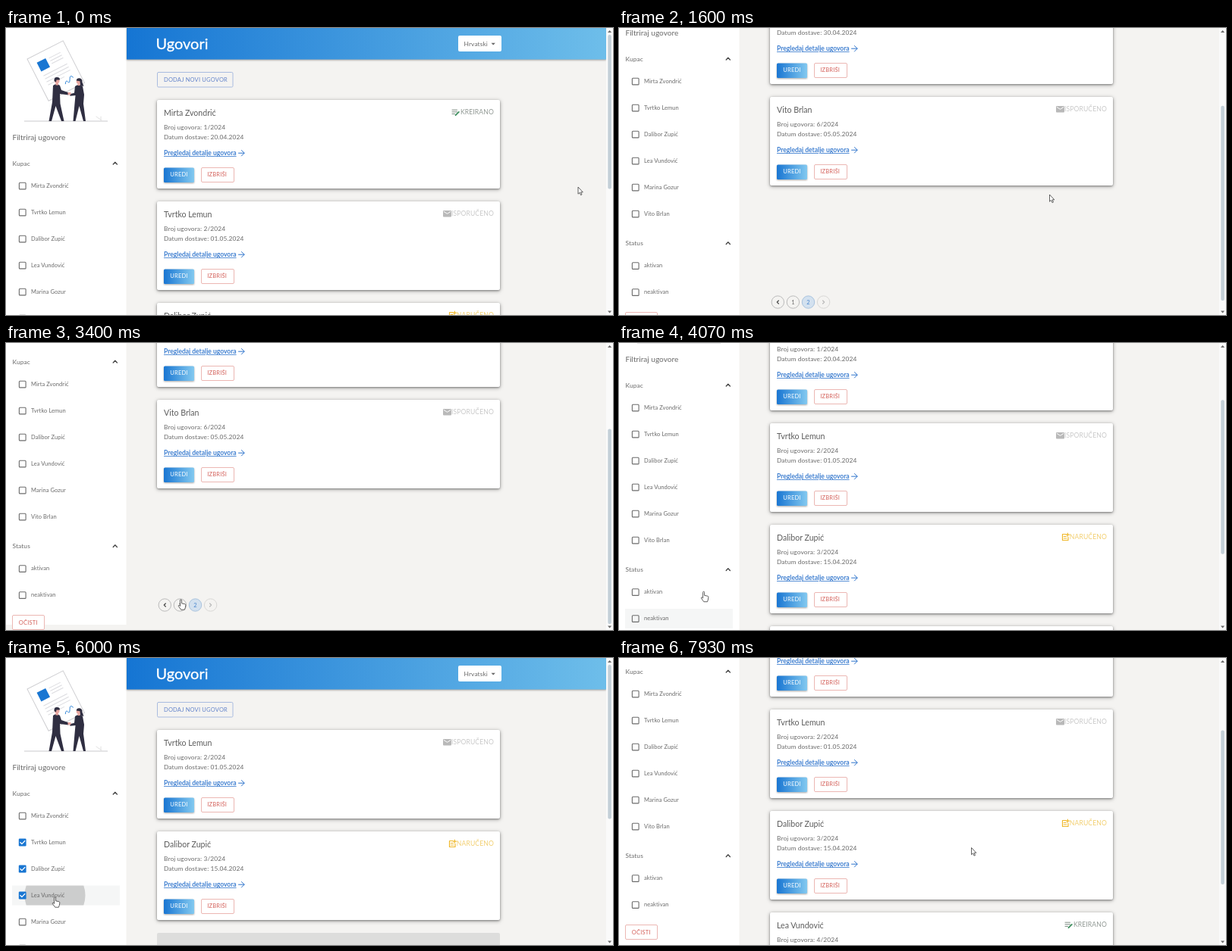
These frames come from a looping animation (800 by 379 pixels, 8000 ms). An HTML page:

```html
<!DOCTYPE html>
<html lang="hr">
<head>
<meta charset="utf-8">
<title>Ugovori</title>
<style>
  html, body { margin: 0; width: 100%; height: 100%; overflow: hidden; background: #f4f3f1; }
  svg { display: block; width: 800px; height: 379px; font-family: Lato, sans-serif; }
  text { fill: #6a6a6a; }
  .title { font-size: 20px; fill: #fff; stroke: #fff; stroke-width: .3px; }
  .heading { font-size: 10.1px; }
  .name { font-size: 10.6px; fill: #5c5c5c; }
  .body { font-size: 8.4px; letter-spacing: .1px; }
  .status { font-size: 8.6px; letter-spacing: .12px; text-anchor: end; }
  .item { font-size: 7.5px; letter-spacing: .08px; }
  .btn { font-size: 7.5px; letter-spacing: .2px; }
  .red { fill: #d4605a; }
  .link { font-size: 8.5px; font-weight: 700; fill: #3f7fd0; text-decoration: underline; }
  .line { fill: none; stroke-linecap: round; stroke-linejoin: round; }
  .card { fill: #fff; filter: drop-shadow(0 1px 1px rgba(0,0,0,.3)) drop-shadow(0 1.5px 2.5px rgba(0,0,0,.35)); }
  .lift { filter: drop-shadow(0 1px 1px rgba(0,0,0,.35)); }
</style>
</head>
<body>
<svg viewBox="0 0 800 379">
  <defs>
    <linearGradient id="bar"><stop stop-color="#1575d3"/><stop offset="1" stop-color="#6ebeea"/></linearGradient>
    <linearGradient id="edit"><stop stop-color="#1976d2"/><stop offset="1" stop-color="#83c9f0"/></linearGradient>
    <clipPath id="rowClip"><rect id="rowBox" x="8" width="142" height="26"/></clipPath>
  </defs>
  <rect width="800" height="379" fill="#f4f3f1"/>
  <g id="page">
    <rect id="side" width="158.5" fill="#fff"/>
    <g id="art"></g>
    <g id="filters"></g>
    <rect class="lift" x="159" width="632" height="41.5" fill="url(#bar)"/>
    <text class="title" x="197.5" y="28">Ugovori</text>
    <rect x="596" y="10" width="57" height="21" rx="2" fill="#fff"/>
    <text class="body" x="603.5" y="23.6">Hrvatski</text>
    <path d="M639.5 19.8h5.4l-2.7 2.8z" fill="#666"/>
    <rect x="199.5" y="58.5" width="99.5" height="19.5" rx="1.5" fill="none" stroke="#a9bbe0"/>
    <text class="btn" x="208" y="70.7" style="fill:#6484cb">DODAJ NOVI UGOVOR</text>
    <g id="list"></g>
  </g>
  <rect x="791" width="9" height="379" fill="#fafafa"/>
  <path d="M793 6l2.6-3 2.6 3zM793 373.5l2.6 3 2.6-3z" fill="#6b6b6b"/>
  <rect id="thumb" x="793.3" width="4.6" rx="2" fill="#c3cfd7"/>
  <g id="cursor" stroke="#3a3a3a" stroke-width=".8" fill="#fff" stroke-linejoin="round">
    <path id="arrow" d="M0 0v9.2l2.1-1.9 1.4 3.3 1.5-.7-1.4-3.1h2.7z"/>
    <path id="hand" d="M-1 1q0-1.300 1-1.300t1 1.300v3.800l4.200.9q1.200.3 1.100 1.600l-.5 3.200-.9 2.700h-4.700l-3.300-4.600q-.6-1.400 1-1.200l1.100 1z"/>
  </g>
</svg>
<script>
const $ = id => document.getElementById(id);
const set = (id, attrs) => { for (const k in attrs) $(id).setAttribute(k, attrs[k]); };
const FPS = 15, FRAMES = 120, VIEW_H = 379, TRACK = 362;
const PER_PAGE = 4, STEP = 134, LOADING = 3;

const CREATED = ['KREIRANO', '#929a95', `
  <path d="M588 108.200h6.500M588 110.800h6.500M588 113.400h3.500" stroke="#7d8b82"/>
  <path d="M592.500 115.200l4.300-4.300" stroke="#3f9160" stroke-width="1.900"/>`];
const SHIPPED = ['ISPORUČENO', '#c9c9c9', `
  <rect x="576" y="107" width="11" height="8.500" rx="1" fill="#b9b9b9"/>
  <path d="M577.300 108.600l4.200 2.700 4.200-2.700" stroke="#fff"/>`];
const ORDERED = ['NARUČENO', '#f2cf70', `
  <path d="M589 107.500h-4.500v8h7.500v-4M586.300 110.500h3M586.300 113h3.500M591.300 106.200v4M589.300 108.200h4" stroke="#f0b92d" stroke-width="1.200"/>`];

const people = [
  ['Mirta Zvondrić', '20.04', CREATED], ['Tvrtko Lemun', '01.05', SHIPPED], ['Dalibor Zupić', '15.04', ORDERED],
  ['Lea Vundović', '13.08', CREATED], ['Marina Gozur', '30.04', CREATED], ['Vito Brlan', '05.05', SHIPPED]
];
const labels = people.map(p => p[0]).concat('aktivan', 'neaktivan');

// What the visitor does, in frames: [start, end, target...]
const scrolls = [[0, 7, 295], [23.5, 26, 0], [33, 40, 154], [59, 66, 0], [90, 97.4, 161]];
const moves = [[5, 12, 249, 347], [16, 22, 567.5, 220], [38, 46, 230.5, 339], [54, 65, 60.5, 324],
  [70, 74, 62, 239], [77, 80, 63, 274], [82, 86, 64.5, 316], [103, 110, 31, 360], [112, 119, 464.5, 250.5]];
const clicks = [
  { at: 14, page: 2 }, { at: 53, page: 1 },
  { at: 74, row: 1 }, { at: 80, row: 2 }, { at: 88, row: 3 },
  { at: 112, clear: true }
];

const rowY = i => 208.5 + 35 * i + (i < people.length ? 0 : 33.5);
const pageHeight = n => Math.max(533, 138 + STEP * n);
const pagerY = n => Math.max(500, 112 + STEP * n);
const pagerX = i => 209.3 + 20.1 * i;
const smooth = u => u * u * (3 - 2 * u);

// Eased value after all moves begun by frame f, never beyond max
function glide(list, f, from, max = Infinity) {
  let pos = from;
  for (const [a, b, ...to] of list) {
    if (f < a) break;
    const e = smooth(Math.min(1, (f - a) / (b - a)));
    pos = pos.map((v, i) => Math.min(v, max) + (to[i] - Math.min(v, max)) * e);
  }
  return pos.map(v => Math.min(v, max));
}

function stateAt(f) {
  let page = 1, checked = [], slots = 0, pages, cards;
  const apply = () => {
    const all = people.map((_, i) => i).filter(i => !checked.length || checked.includes(i));
    pages = Math.ceil(all.length / PER_PAGE);
    cards = all.slice((page - 1) * PER_PAGE, page * PER_PAGE);
  };
  apply();
  for (const c of clicks) {
    if (c.at > f) break;
    slots = cards.length;
    if (c.page) page = c.page;
    else checked = c.clear ? [] : [...checked, c.row];
    apply();
    // new slots stay grey until their data arrives
    if (f - c.at < LOADING) cards = Array.from({ length: PER_PAGE }, (_, i) => i < slots ? cards[i] ?? -1 : -1);
  }
  return { page, pages, checked, cards };
}

const chevron = (x, y, d, c) => `<path class="line" d="M${x - d} ${y - 2}l${2 * d} 2l${-2 * d} 2" stroke="${c}" stroke-width="1.2"/>`;
const section = (label, y) => `<text class="body" x="8.5" y="${y + 3.2}">${label}</text>
  <path class="line" d="M141.2 ${y + 1.5}l2.6 -2.8l2.6 2.8" stroke="#444" stroke-width="1.3"/>`;
const outline = (x, y, w) => `x="${x}" y="${y}" width="${w}" height="19" rx="1.5" fill="#fff" stroke="#ecb7b3"`;

function card(id, slot) {
  const y = 95 + STEP * slot;
  if (id < 0) return `<rect x="199" y="${y}" width="452" height="117" rx="2" fill="#dddddc"/>`;
  const [name, date, [label, color, icon]] = people[id];
  return `<g transform="translate(0 ${y - 95})">
    <rect class="card" x="199" y="95" width="452" height="117" rx="2"/>
    <text class="name" x="208" y="116.3">${name}</text>
    <text class="body" x="208" y="134.4">Broj ugovora: ${id + 1}/2024</text>
    <text class="body" x="208" y="147">Datum dostave: ${date}.2024</text>
    <text class="link" x="208" y="168">Pregledaj detalje ugovora</text>
    <path class="line" d="M306.500 165.200h7.500m-3.600-3.700l3.700 3.700l-3.700 3.700" stroke="#2f74cc"/>
    <g class="line">${icon}</g>
    <text class="status" x="643" y="113.5" style="fill:${color}">${label}</text>
    <rect class="lift" x="208" y="184.5" width="40" height="19.5" rx="1.5" fill="url(#edit)"/>
    <text class="btn" x="216.3" y="196.4" style="fill:#fff">UREDI</text>
    <rect ${outline(257.5, 184.5, 43)}/>
    <text class="btn red" x="265.3" y="196.4">IZBRIŠI</text></g>`;
}

function pager(n, page, pages) {
  const y = pagerY(n);
  return Array.from({ length: pages + 2 }, (_, i) => {
    const x = pagerX(i), dir = i === 0 ? -1 : i > pages ? 1 : 0;
    const on = i === page, off = dir && (dir < 0 ? page === 1 : page === pages);
    return `<circle cx="${x}" cy="${y}" r="8.2" fill="${on ? '#d3e1ef' : 'none'}" stroke="${on ? '#a9c3de' : off ? '#d9d8d6' : '#bbb'}"/>`
      + (dir ? chevron(x, y, dir, off ? '#b8b8b8' : '#444')
        : `<text class="item" x="${x}" y="${y + 2.7}" text-anchor="middle" ${on ? 'style="fill:#4a86cd"' : ''}>${i}</text>`);
  }).join('');
}

function row(label, i, checked) {
  const y = rowY(i);
  const box = checked
    ? `<rect x="16.8" y="${y - 4.9}" width="9.8" height="9.8" rx="1.2" fill="#1976d2"/>
       <path class="line" d="M18.9 ${y}l2 2.1l3.9 -4.1" stroke="#fff" stroke-width="1.2"/>`
    : `<rect x="17.4" y="${y - 4.3}" width="8.7" height="8.7" rx="1" fill="none" stroke="#6c6c6c" stroke-width="1.1"/>`;
  return `${box}<text class="item" x="33" y="${y + 2.4}">${label}</text>`;
}

const filters = checked => `<text class="heading" x="8.5" y="148">Filtriraj ugovore</text>
  ${section('Kupac', 178.5)}${section('Status', 422)}
  <rect id="hover" x="8" width="142" height="26" fill="#f5f6f6"/>
  <circle id="ripple" clip-path="url(#rowClip)"/>
  ${labels.map((l, i) => row(l, i, checked.includes(i))).join('')}
  <rect ${outline(8.5, 513.5, 42)}/>
  <text class="btn red" x="16.8" y="525.5">OČISTI</text>`;

const paperLines = Array.from({ length: 7 }, (_, i) =>
  i < 3 ? `M54 ${53 + 4 * i}h17` : `M37 ${57 + 4.5 * i}h${i < 6 ? 35 : 24}`).join('');

$('art').innerHTML = `
  <g transform="rotate(-27 28 41)" fill="none">
    <rect x="28" y="41" width="53" height="62" fill="#fff" stroke="#cfcfd2"/>
    <rect x="37" y="51" width="13" height="13" fill="#1976d2"/>
    <path d="${paperLines}" stroke="#dcdce0"/>
    <path class="line" d="M58 93q3-5 4-1t4-2 5 0" stroke="#1976d2" stroke-width=".8"/>
  </g>
  <path d="M24 123h110" stroke="#c9c9cc"/>
  <path class="line" d="M119 117l7 5m-1-5v5" stroke="#e2e2e2"/>
  <g fill="#2f2e41">
    <path d="M62 76q5-4 9 0l2 6 10 3.500-.6 3-11.400-1.500.5 13 5 23h-3.500l-7.500-20-5.500 20h-3.500l4.500-25z"/>
    <path d="M91 77q5-4 10 0l2 11-1 12 3 23h-3l-5.500-20-5 20h-3l2-23 1-11-7 .8-.5-2.500 6-1.500z"/>
  </g>
  <path d="M65.500 71h3.500v4.500h-3.500zM94.500 72h3v4h-3zM81.500 85h4v3.300h-4z" fill="#e8a6a0"/>
  <g fill="#e8a6a0"><circle cx="67.3" cy="69.8" r="3.2"/><circle cx="95.700" cy="70.800" r="3"/></g>
  <path d="M63.500 70q-.5-5 3.800-5t3.500 3.500h-4.300l-.5 3zM92.700 69.500q.5-3.500 4-3.300 4.300.5 3.800 5.500l2 5-4.500-.5-.5-6z" fill="#2f2e41"/>`;

let shown = '';
function show(state) {
  const key = JSON.stringify(state);
  if (key === shown) return;
  shown = key;
  const { page, pages, checked, cards } = state, h = pageHeight(cards.length);
  $('list').innerHTML = cards.map(card).join('') + pager(cards.length, page, pages);
  $('filters').innerHTML = filters(checked);
  set('side', { height: h > 533 ? h : 526 });
  set('thumb', { height: TRACK * VIEW_H / h });
}

function draw(f) {
  const state = stateAt(f), n = state.cards.length, h = pageHeight(n);
  show(state);

  const [scroll] = glide(scrolls, f, [0], h - VIEW_H);
  set('page', { transform: `translate(0 ${-Math.round(scroll)})` });
  set('thumb', { y: 9 + TRACK * scroll / h });

  // hover does not update while the page is scrolling
  const [x, y] = glide(moves, f, [754, 210]);
  const busy = scrolls.find(([a, b]) => a < f && f < b);
  const docY = y + (busy ? glide(scrolls, busy[0], [0], h - VIEW_H)[0] : scroll);
  const over = x < 150 ? labels.findIndex((_, i) => Math.abs(docY - rowY(i)) < 13) : -1;
  const onClear = x < 51 && Math.abs(docY - 523) < 11;
  const onPager = Math.abs(docY - pagerY(n)) < 9 && x > 201 && x < pagerX(state.pages + 1);
  const hand = over >= 0 || onClear || onPager;
  set('cursor', { transform: `translate(${x} ${y})` });
  set('hand', { opacity: +hand });
  set('arrow', { opacity: +!hand });
  set('hover', { y: rowY(Math.max(over, 0)) - 13, opacity: over < 0 ? 0 : 1 });

  const hit = clicks.find(c => c.row && f >= c.at && f < c.at + 5);
  set('ripple', { opacity: 0 });
  if (hit) {
    const age = f - hit.at, cy = rowY(hit.row);
    set('rowBox', { y: cy - 13 });
    set('ripple', { cx: x, cy, r: 12 + 14 * age, opacity: Math.min(.17, .06 * (5 - age)) });
  }
}

const start = performance.now();
function tick() {
  const t = performance.now() - start;
  draw(Math.floor((t + 5) * FPS / 1000) % FRAMES);
  requestAnimationFrame(tick);
}
tick();
</script>
</body>
</html>
```
